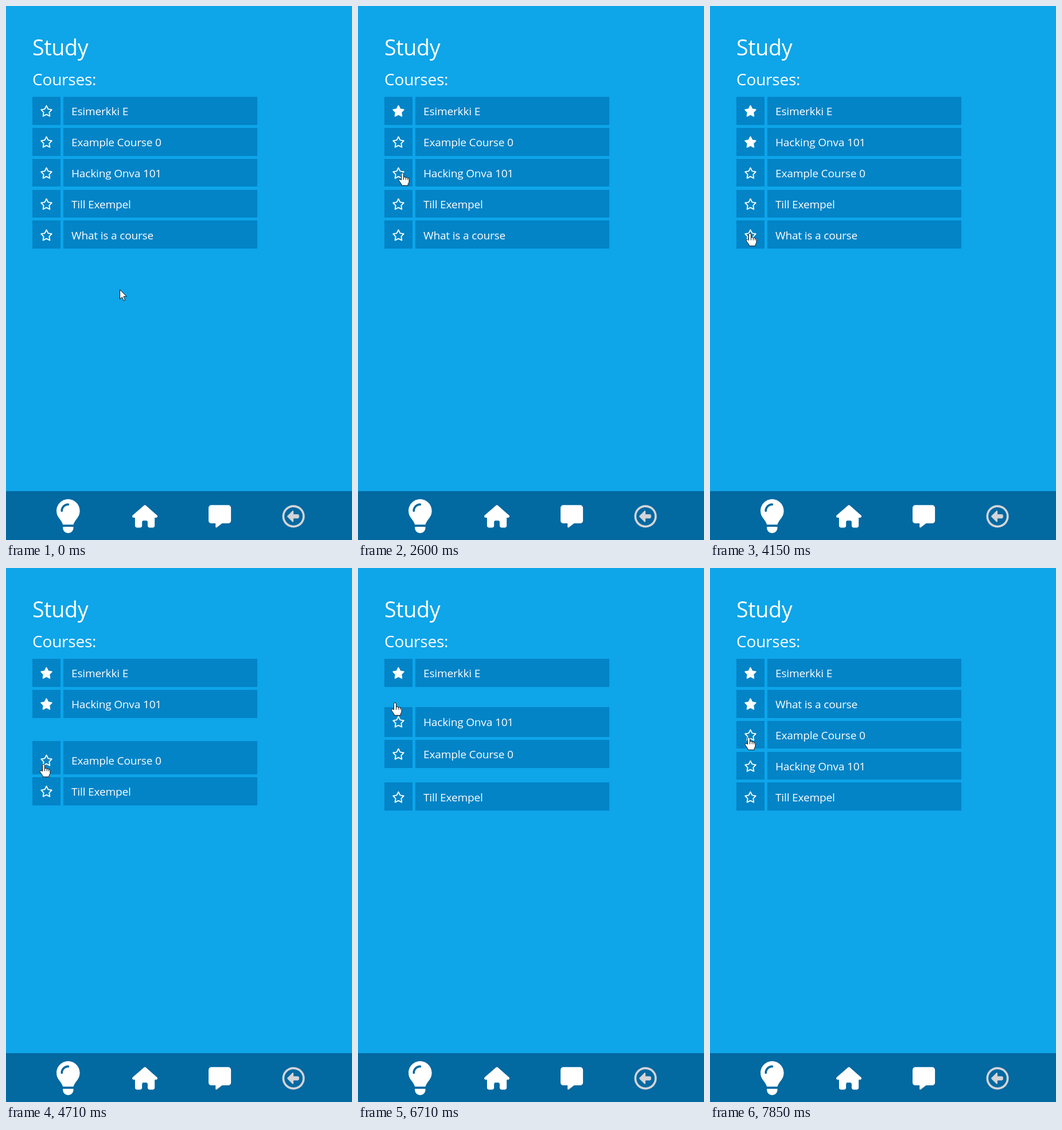
Write an HTML page that moves like this. It is 603 px wide and 929 px high and loops after 8 s.

```html
<!DOCTYPE html>
<html lang="en">
<head>
<meta charset="utf-8">
<title>Study</title>
<style>
  html, body { margin: 0; width: 100%; height: 100%; overflow: hidden; background: #0ea5e9; }
  svg { display: block; width: 603px; height: 929px; }
  text { font: 19px "Open Sans", "Noto Sans", sans-serif; letter-spacing: -.008em; fill: #fff; }
  .title { font-size: 37.6px; }
  .head { font-size: 28px; }
  .row rect { fill: #0284c7; shape-rendering: crispEdges; }
  .row path { stroke: #fff; stroke-width: 48; stroke-linejoin: round; }
  .cursor { fill: #fff; stroke: #111; stroke-linejoin: round; }
</style>
</head>
<body>
<svg viewBox="0 0 603 929">
  <rect width="603" height="929" fill="#0ea5e9"/>
  <text class="title" x="46" y="86">Study</text>
  <text class="head" x="46" y="138">Courses:</text>
  <g id="list"></g>

  <rect y="844" width="603" height="85" fill="#0369a1"/>
  <g fill="#fff">
    <path transform="translate(86.2 858) scale(.1152)" d="M272 384c9.600-32 29.500-59 49.200-86 5.200-7 10.400-14 15.400-21.500C356.400 248 368 213.300 368 176 368 78.800 289.200 0 192 0S16 78.800 16 176c0 37.300 11.600 72 31.400 100.500 5 7.500 10.200 14.500 15.400 21.500 19.800 27 39.700 54 49.200 86zM192 512c44.200 0 80-35.800 80-80v-16H112v16c0 44.200 35.800 80 80 80zM112 176a16 16 0 0 1-32 0c0-61.900 50.100-112 112-112a16 16 0 0 1 0 32c-44.200 0-80 35.800-80 80z"/>
    <path transform="translate(220 868.300) scale(.0764)" d="M288 0c-8 0-15 2-22 8L10 231.500C3 238.500 0 246.500 0 255.500c0 18 14 32 32 32h32V472c0 22 18 40 40 40h80c22 0 40-18 40-40v-88c0-18 14-32 32-32h64c18 0 32 14 32 32v88c0 22 18 40 40 40h80c22 0 40-18 40-40V287.500h32c17 0 32-14 32-32 1-9-3-17-11-24L309 7c-6-5-13-7-21-7z"/>
    <path transform="translate(353 868.300) scale(.0764)" d="M64 0A64 64 0 0 0 0 64v288a64 64 0 0 0 64 64h96v80c0 12 14 21 25.600 12.800L309.300 416H448a64 64 0 0 0 64-64V64a64 64 0 0 0-64-64z"/>
  </g>
  <g transform="translate(481.500 868.300) scale(.0764)" fill="#d4d4d8">
    <circle cx="256" cy="256" r="232" fill="none" stroke="#d4d4d8" stroke-width="48"/>
    <path d="M116.700 244.700l112-112c10-10 27.300-3 27.300 11.300v64h96a32 32 0 0 1 32 32v32a32 32 0 0 1-32 32h-96v64c0 14.300-17.300 21.300-27.300 11.300l-112-112c-6.200-6.200-6.200-16.400 0-22.600z"/>
  </g>

  <path class="cursor" id="arrow" d="M0 0V16.500l3.800-3.600 2.700 6 2.600-1.100-2.700-6h5.300z"/>
  <path class="cursor" id="hand" d="M-2 12V2a2 2 0 0 1 4 0V8q0-1 2-1t2 1.500q.5-.9 1.800-.7 1.500.2 1.500 1.600.4-.6 1.200-.4 1 .3 1 1.800V15q0 2-1.800 4v2.800H-1.500V20L-6 13.500q-1-1.500.4-2.500 1.200-.7 2.400.6zM2 8v4M5.800 8.500V12M9 9.500V12"/>
</svg>
<script>
const LOOP = 8000, STEP = LOOP / 56;
const NS = "http://www.w3.org/2000/svg";
const STAR = "M288 24L365 172 526 198 412 320 438 487 288 412 138 487 164 320 50 198 211 172Z";
const NAMES = ["Esimerkki E", "Example Course 0", "Hacking Onva 101", "Till Exempel", "What is a course"];

// Each toggle: time, list order after it, starred courses
const STATES = [
  { at: 0, order: [0, 1, 2, 3, 4], stars: [] },
  { at: 1560, order: [0, 1, 2, 3, 4], stars: [0] },
  { at: 2902, order: [0, 2, 1, 3, 4], stars: [0, 2] },
  { at: 4329, order: [0, 2, 4, 1, 3], stars: [0, 2, 4] },
  { at: 6583, order: [0, 4, 1, 2, 3], stars: [0, 4] }
];

// Pointer stops: step, x, y
const STOPS = [
  [0, 198, 493], [7, 78, 182], [8, 78, 182], [10, 81, 204], [13, 96, 250],
  [16, 92, 296], [19, 72, 288], [20, 72, 288], [23, 77, 304], [27, 70, 396],
  [30, 68, 394], [33, 65, 341], [36, 64, 239], [38, 64, 234], [47, 64, 234],
  [52, 67, 294], [56, 67, 294]
];

const $ = id => document.getElementById(id);

function add(parent, tag, attrs) {
  const el = document.createElementNS(NS, tag);
  for (const key in attrs) el.setAttribute(key, attrs[key]);
  return parent.appendChild(el);
}

const rows = NAMES.map(name => {
  const g = add($("list"), "g", { class: "row" });
  const boxes = [[46, 49], [100, 338]].map(([x, width]) => add(g, "rect", { x, width, height: 48.8 }));
  const star = add(g, "path", { d: STAR });
  const label = add(g, "text", { x: 114 });
  label.textContent = name;
  return { g, boxes, star, label };
});

const slotY = i => 157.8 + 53.9 * i;
const cubicOut = p => 1 - (1 - p) ** 3;
const smooth = p => p * p * (3 - 2 * p);

function rowY(id, state, prev, time) {
  const to = slotY(state.order.indexOf(id));
  const from = slotY(prev.order.indexOf(id));
  if (to === from) return to;
  const length = Math.sqrt(Math.abs(to - from)) * 120;
  return from + (to - from) * cubicOut(Math.min(1, (time - state.at) / length));
}

function drawRows(time) {
  const n = STATES.filter(s => s.at <= time).length - 1;
  const state = STATES[n], prev = STATES[Math.max(0, n - 1)];
  for (const id of state.order) {
    const { g, boxes, star, label } = rows[id];
    const y = rowY(id, state, prev, time);
    const base = Math.round(y + 32.2);
    boxes.forEach(box => box.setAttribute("y", y));
    label.setAttribute("y", base);
    star.setAttribute("transform", `translate(59.25 ${base - 17.4}) scale(.039)`);
    star.setAttribute("fill", state.stars.includes(id) ? "#fff" : "none");
    $("list").appendChild(g);
  }
}

function drawPointer(step) {
  const i = STOPS.findIndex(s => s[0] > step);
  const [k0, x0, y0] = STOPS[i - 1], [k1, x1, y1] = STOPS[i];
  const p = smooth((step - k0) / (k1 - k0));
  const x = Math.round(x0 + (x1 - x0) * p), y = Math.round(y0 + (y1 - y0) * p);
  const over = y < 422;
  for (const id of ["arrow", "hand"]) {
    $(id).setAttribute("transform", `translate(${x + .5} ${y + .5})`);
    $(id).style.display = (id === "hand") === over ? "" : "none";
  }
}

// The screen updates seven times a second
function draw(ms) {
  const step = Math.min(55, Math.floor((ms % LOOP + 20) / STEP));
  drawRows(step * STEP);
  drawPointer(step);
}

const start = performance.now();
function tick() {
  draw(performance.now() - start);
  requestAnimationFrame(tick);
}
tick();
</script>
</body>
</html>
```
